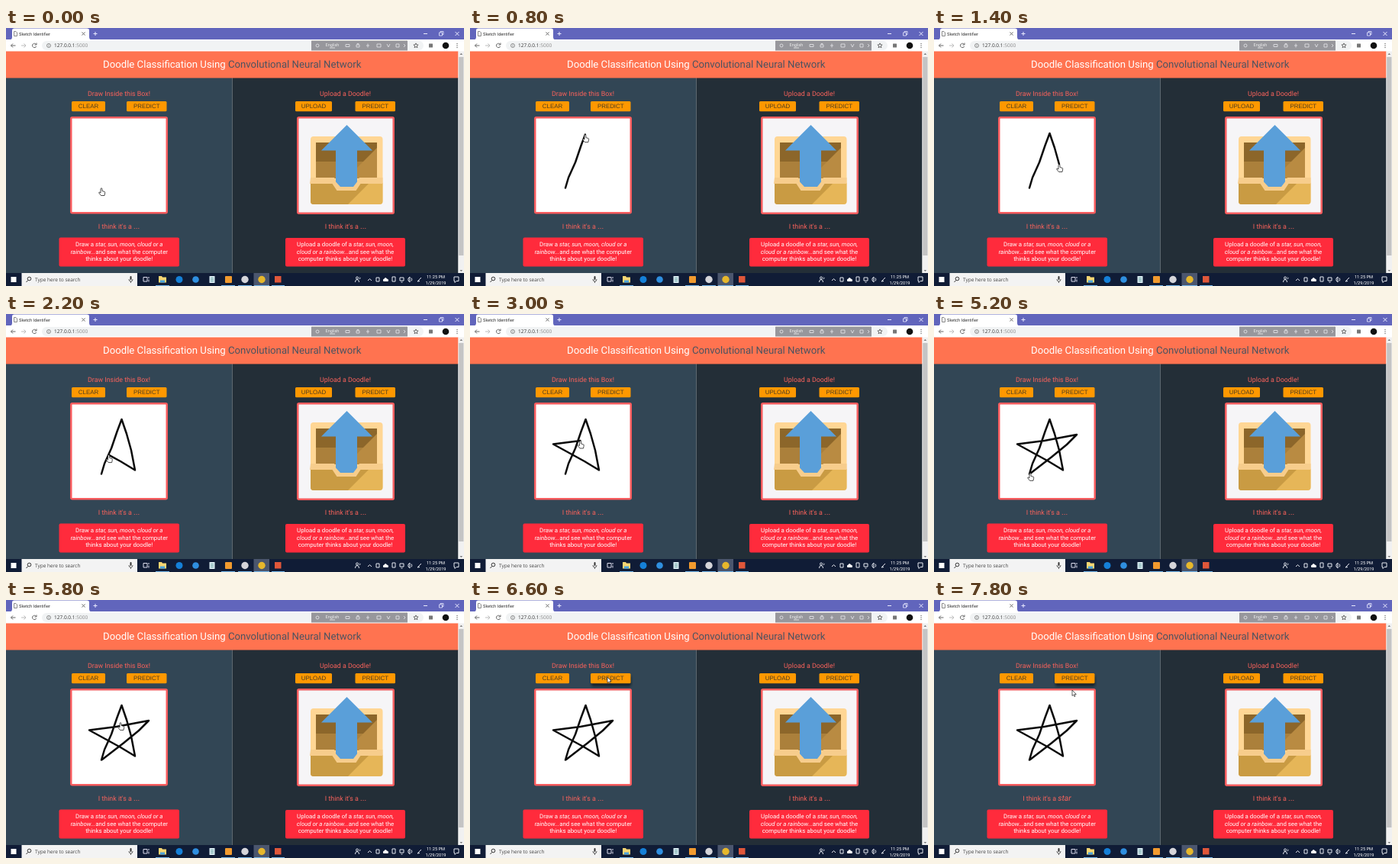
Animation, 600 px wide and 338 px high, one loop 8 s. Source, as an HTML page:

```html
<!DOCTYPE html>
<html lang="en">
<head>
<meta charset="utf-8">
<title>Sketch Identifier</title>
<style>
  html, body { margin: 0; width: 100%; height: 100%; overflow: hidden; background: #fff; }
  svg { display: block; width: 600px; height: 338px; text-rendering: geometricPrecision; }
  text { font-family: Roboto, sans-serif; white-space: pre; }
  .mid { text-anchor: middle; }
  .title { font-size: 13.19px; fill: #fff; }
  .label { font-size: 8.85px; fill: #fa625b; text-anchor: middle; }
  .answer { font-size: 10.4px; }
  .btn rect { fill: #ff9800; }
  .btn text { font: 7.9px "Liberation Sans", Arial, sans-serif; fill: #4b3d20; text-anchor: middle; }
  .card rect { fill: #ff2b3c; }
  .card text { font-size: 7.85px; fill: #fff; text-anchor: middle; }
  .frame { fill: #fff; stroke: #f95c5e; stroke-width: 2.5; }
  .small { font-family: "Open Sans", sans-serif; }
  .thin { fill: none; stroke-width: 1; }
  i, .it { font-style: italic; }
</style>
</head>
<body>
<svg viewBox="0 0 600 338">
  <defs>
    <filter id="soft" x="-20%" y="-50%" width="140%" height="250%"><feGaussianBlur stdDeviation="1.5"/></filter>
  </defs>

  <!-- browser -->
  <rect width="600" height="16" fill="#6165bc"/>
  <path d="M5 15.5Q8 15 8 12V3Q8 .5 11 .5H106Q109 .5 109 3V12Q109 15 112 15.5Z" fill="#fff"/>
  <path d="M10.5 4.5h2.5l1.5 1.5v4.500h-4z" class="thin" stroke="#888" stroke-width=".7"/>
  <text x="17" y="9.600" font-size="5.700" fill="#333">Sketch Identifier</text>
  <path d="M99.500 5.500l4 4m0-4l-4 4" class="thin" stroke="#666"/>
  <g class="thin" stroke="#e9eaff">
    <path d="M114.500 7.500h5m-2.500-2.500v5M547 7.500h5M588.500 5l5 5m0-5l-5 5"/>
    <path d="M567.500 6h4v4h-4zM569 6v-1.500h4v4h-1.500" stroke-width=".8"/>
  </g>
  <rect y="15" width="600" height="15.500" fill="#fff"/>
  <rect x="47" y="17" width="500" height="12" rx="6" fill="#f1f3f4"/>
  <g class="thin" stroke="#666">
    <path d="M12.500 23h-6m2.500-2.500L6.500 23l2.500 2.500"/>
    <path d="M20 23h6m-2.500-2.500L26 23l-2.500 2.500" stroke="#bbb"/>
    <path d="M39.500 21.500a2.700 2.700 0 1 0 .2 2.500M40 19.500v2.500h-2.500"/>
    <circle cx="56" cy="23" r="2.500" stroke-width=".7"/>
    <path d="M56 22.700v1.600M56 21.400v.7" stroke-width=".7"/>
  </g>
  <text class="small" x="63" y="25.300" font-size="6.500" fill="#333">127.0.0.1<tspan fill="#888">:5000</tspan></text>
  <rect x="400" y="16.500" width="126" height="13" fill="#97979c"/>
  <g class="thin" stroke="#d8d8dc">
    <circle cx="408" cy="23" r="2"/>
    <path d="M445 24.500h5v-3h-5zM459 22h4v3h-4zm1 0v-1.500h2v1.500M474 20.500v5m-2-2.500h4M486 21h5v4h-5zM499 21l2 4 2-4M511 21h4v4h-4zM521 21l2 2-2 2"/>
  </g>
  <text class="mid" x="427.500" y="24.200" font-size="5.500" fill="#eee">English</text>
  <path d="M424 26h7" class="thin" stroke="#ddd" stroke-width=".7"/>
  <path d="M537 19.900l.9 2 2.200.2-1.700 1.500.5 2.200-1.900-1.200-1.900 1.200.5-2.200-1.700-1.500 2.200-.2z" class="thin" stroke="#666" stroke-width=".8"/>
  <rect x="554" y="20.500" width="5" height="5" rx=".5" fill="#777"/>
  <circle cx="576" cy="23" r="4.300" fill="#111"/>
  <g fill="#666"><circle cx="591" cy="20.500" r=".7"/><circle cx="591" cy="23" r=".7"/><circle cx="591" cy="25.500" r=".7"/></g>

  <!-- page -->
  <rect y="65" width="296.500" height="256" fill="#324655"/>
  <rect x="296.500" y="65" width="296" height="256" fill="#232e37"/>
  <rect y="30.500" width="592.500" height="35" fill="#ff7350"/>
  <text class="title" x="127" y="52.300">Doodle Classification Using <tspan fill="#4b5360">Convolutional Neural Network</tspan></text>
  <rect x="592.500" y="30.500" width="7.500" height="291" fill="#f1f1f1"/>
  <path d="M594.500 35l1.800-2 1.800 2zM594.500 317l1.800 2 1.800-2z" fill="#777"/>
  <rect x="593.200" y="38" width="6.200" height="260" fill="#c4c4c4"/>

  <text class="label" x="148" y="89.200">Draw Inside this Box!</text>
  <text class="label" x="444.500" y="89.200">Upload a Doodle!</text>
  <rect id="glow" x="159" y="99" width="52" height="14" rx="2" fill="#10181f" opacity=".75" filter="url(#soft)"/>
  <g id="buttons" class="btn"></g>

  <rect class="frame" x="85.250" y="117.250" width="125.500" height="125" rx="1.500"/>
  <rect class="frame" x="382.250" y="117.250" width="125.500" height="125.500" rx="1.500" style="fill:#f6f5f7"/>

  <!-- tray and arrow -->
  <rect x="399" y="142" width="94.500" height="89" rx="4" fill="#ffd694"/>
  <path d="M406 150h80v46h-80z" fill="#8c662a"/>
  <path d="M406 175h80v22h-80z" fill="#ab803b"/>
  <path d="M486 157v40h-40z" fill="#b98b42"/>
  <path d="M399 203h30l6 9h22l6-9h30.500v24q0 4-4 4h-86.500q-4 0-4-4z" fill="#e6b658"/>
  <path d="M399 204h30l6 8h22l6-8h12l-27 27h-45q-4 0-4-4z" fill="#c99b43"/>
  <path d="M399 196h31l7 11h19l7-11h30.500v8h-29l-6 9h-25l-6-9h-29.500z" fill="#f7cd8c"/>
  <path d="M446.500 127l33.500 33.500h-20v41l-5 6.500h-17l-6-6.500v-41h-19z" fill="#5a9fd9"/>

  <text class="label" x="148" y="263">I think it's a <tspan id="answer" class="answer">...</tspan></text>
  <text class="label" x="445" y="263">I think it's a <tspan class="answer">...</tspan></text>

  <g class="card">
    <rect x="69.500" y="274.500" width="157.500" height="38" rx="2"/>
    <text x="148.300" y="286.300">Draw a <tspan class="it">star, sun, moon, cloud or a</tspan></text>
    <text x="148.300" y="295.900"><tspan class="it">rainbow...</tspan>and see what the computer</text>
    <text x="148.300" y="305.400">thinks about your doodle!</text>
    <rect x="366" y="275" width="157" height="37.500" rx="2"/>
    <text x="444.500" y="286.300">Upload a doodle of a <tspan class="it">star, sun, moon,</tspan></text>
    <text x="444.500" y="295.900"><tspan class="it">cloud or a rainbow...</tspan>and see what the</text>
    <text x="444.500" y="305.400">computer thinks about your doodle!</text>
  </g>

  <!-- taskbar -->
  <rect y="321" width="600" height="17" fill="#101c36"/>
  <rect x="6.500" y="326" width="7" height="7" fill="#fff"/>
  <rect x="20.500" y="321" width="151.500" height="17" fill="#f3f3f3"/>
  <g class="thin" stroke="#333">
    <circle cx="30.500" cy="328.500" r="2.300"/><path d="M28.800 330.500l-2.300 2.500"/>
    <path d="M161 329q0 3 2.500 3t2.500-3M163.500 332v2" stroke-width=".8"/>
  </g>
  <rect x="162.500" y="325" width="2" height="5" rx="1" fill="#333"/>
  <text class="small" x="38" y="332" font-size="6.500" fill="#444">Type here to search</text>
  <path d="M180 326.500h5v5.500h-5zM187 326v2m0 1.500v3" class="thin" stroke="#dde" stroke-width=".9"/>
  <rect x="324.500" y="321" width="20.500" height="17" fill="#4b566e"/>
  <path d="M200 325h4l1 1.500h5v7h-10z" fill="#f7d673"/><path d="M202 330.500h6v3h-6z" fill="#4aa3dd"/>
  <circle cx="227" cy="329.500" r="4.500" fill="#1580d8"/>
  <circle cx="248.500" cy="329.500" r="4.300" fill="#2f8fe0"/>
  <path d="M266.500 325h7v9h-7z" fill="#d9ecf2"/><path d="M268 327.500h4m-4 2h4m-4 2h4" class="thin" stroke="#7aa" stroke-width=".7"/>
  <rect x="287" y="325" width="9" height="9" rx="1" fill="#f29a2e"/>
  <circle cx="313" cy="329.500" r="4.700" fill="#d5d5da"/>
  <circle cx="335" cy="329.500" r="4.700" fill="#e6b72c"/>
  <rect x="352" y="325" width="8.500" height="8.500" fill="#e0573a"/>
  <path d="M196 337.500h18m68 0h18m4 0h18m3 0h20m3 0h17" class="thin" stroke="#76b9ed"/>
  <g class="thin" stroke="#e4e8f0" stroke-width=".9">
    <circle cx="460" cy="327.500" r="1.500"/><path d="M457.500 333q0-3.500 2.500-3.500t2.500 3.500M463 326.500q2 1 0 2.500"/>
    <path d="M474 331l2.500-2.500 2.500 2.500M485 327h4v5h-4z"/>
    <path d="M506 326h4v6h-4zM516 327h5v4h-5zm1.500 6h2M527 331v-3l2-2v7l-2-2M531 327.500q1.500 2 0 4M539 332l5-5m-5 5l3-.5"/>
    <path d="M587 326h6v5.500h-3l-2 2v-2h-1z"/>
  </g>
  <path d="M494.500 332q-1.500-3 1-3.500 1.500-3 3.500 0 3 .5 1.500 3.500z" fill="#fff"/>
  <g font-size="5.700" fill="#fff"><text class="mid" x="563" y="327.600">11:25 PM</text><text class="mid" x="563" y="336">1/29/2019</text></g>

  <polyline id="ink" fill="none" stroke="#0a0a0a" stroke-width="2.500" stroke-linecap="round" stroke-linejoin="round"/>
  <path id="hand" d="M-1 1Q0-.6 1 1V4l3.300 1Q5 5.500 4.500 7.500L4 10H-.5L-3.300 6.500Q-3.500 5.500-2.300 5.700L-1 6.500Z" fill="#fff" stroke="#222" stroke-width=".8"/>
  <path id="arrow" d="M0 0V7.500L1.700 6 2.900 8.600 4.100 8 3 5.500H5.300Z" fill="#fff" stroke="#222" stroke-width=".7"/>
</svg>
<script>
const LOOP = 8000, STEP = 200, INK_END = 4800, ANSWER_AT = 7800;
const $ = id => document.getElementById(id);

$('buttons').innerHTML = [[86, 44, 'CLEAR'], [158, 52.5, 'PREDICT'], [379, 48, 'UPLOAD'], [457.5, 52.5, 'PREDICT']]
  .map(([x, w, s]) => `<rect x="${x}" y="96" width="${w}" height="13.300" rx="1.500"/><text x="${x + w / 2}" y="105.400">${s}</text>`)
  .join('');

// pointer path: time, x, y
const track = [
  [0, 125, 209.5], [160, 129, 196], [400, 138, 176], [620, 145.5, 154], [820, 151.5, 138],
  [1080, 158, 157], [1400, 164, 178.5], [1750, 169, 204.5],
  [2020, 150, 193], [2500, 109, 170.5],
  [3000, 144.5, 166], [3500, 187, 158],
  [3720, 174, 171], [4000, 154.5, 187], [INK_END, 126, 209],
  [5400, 126, 208], [6300, 180, 101], [6900, 180, 101], [7200, 181, 118], [LOOP, 181, 118]
];

function pointer(t) {
  const i = track.findIndex(p => p[0] > t);
  const [t0, x0, y0] = track[i - 1], [t1, x1, y1] = track[i];
  const k = (t - t0) / (t1 - t0);
  return [x0 + (x1 - x0) * k, y0 + (y1 - y0) * k];
}

function draw(t) {
  const tip = pointer(t);
  const inkTime = Math.min(t, INK_END);
  const points = track.filter(p => p[0] <= inkTime).map(p => p.slice(1));
  points.push(pointer(inkTime));
  $('ink').setAttribute('points', t ? points.join(' ') : '');

  const onCanvas = t < 6900 && tip[1] > 118;
  for (const [id, on] of [['hand', onCanvas], ['arrow', !onCanvas]]) {
    $(id).setAttribute('transform', `translate(${tip})`);
    $(id).style.display = on ? '' : 'none';
  }
  $('glow').style.display = t >= 6300 ? '' : 'none';

  const done = t >= ANSWER_AT;
  $('answer').textContent = done ? 'star' : '...';
  $('answer').style.fontStyle = done ? 'italic' : 'normal';
}

function tick() {
  draw(Math.floor(performance.now() % LOOP / STEP) * STEP);
  requestAnimationFrame(tick);
}
tick();
</script>
</body>
</html>
```
